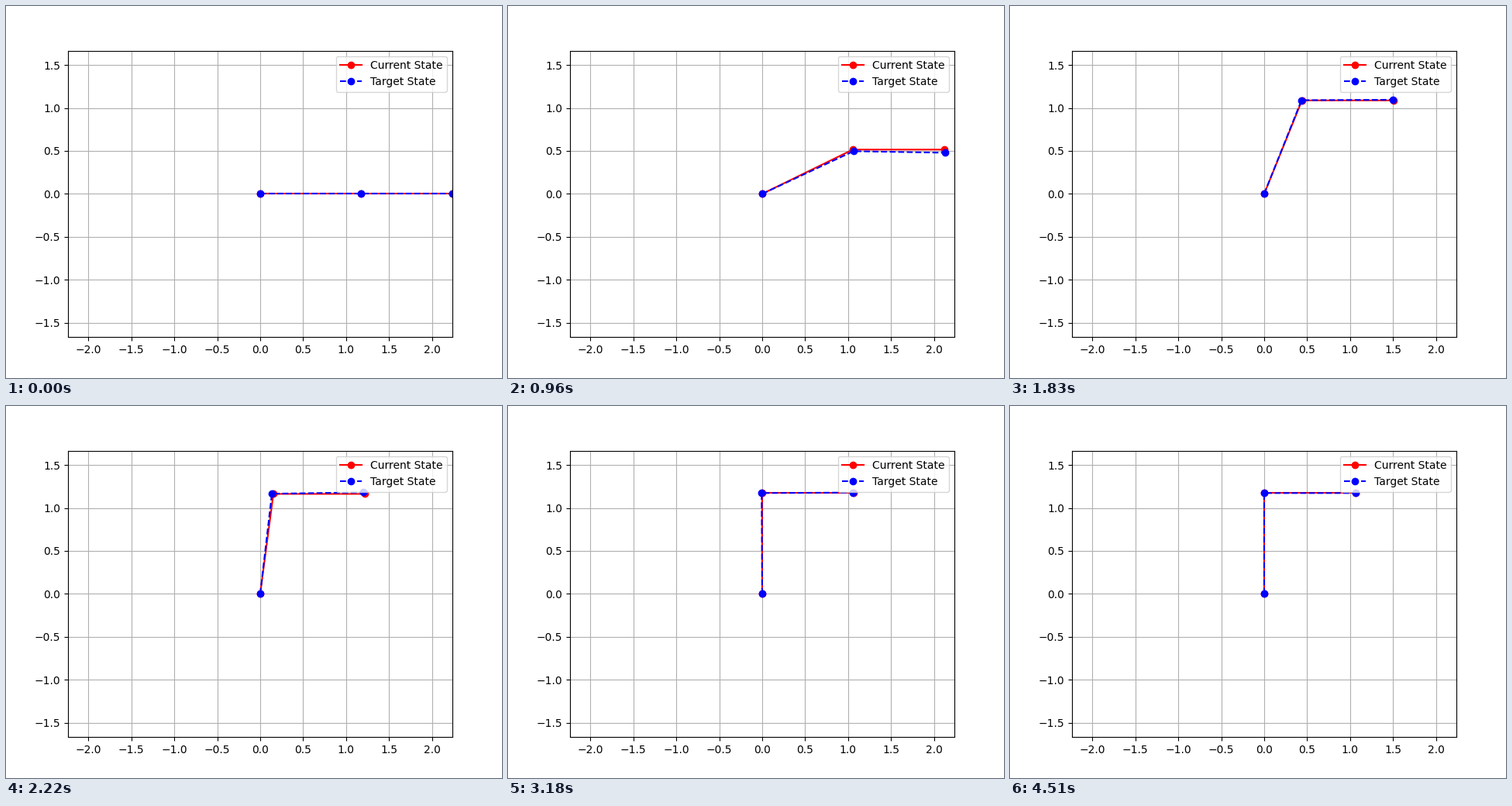
Write a matplotlib script that moves like this. It is 640 px wide and 480 px high and loops after 9.46 s.

```python
import numpy as np
import matplotlib.pyplot as plt
from matplotlib.animation import FuncAnimation

LOOP, TICK = 9460, 20          # ms
STEP_MS, LAST = 30, 150        # motion step length, final step
L1, L2 = 1.174, 1.064          # link lengths
MOVE = 3.0                     # seconds to swing a quarter turn
DT = 1 / 30                    # simulated seconds per step
KP, KD = 30, 10                # PD gains
SUB = 40                       # integration substeps


def swing(t):
    """Cubic joint path: angle and angular speed at time t."""
    u = min(t / MOVE, 1)
    angle = np.pi / 2 * (3 * u**2 - 2 * u**3)
    speed = np.pi / 2 * 6 * u * (1 - u) / MOVE
    return angle, speed


def follow():
    """Angle of a PD-driven joint chasing the swing, one value per step."""
    q, v, h = 0.0, 0.0, DT / SUB
    out = [q]
    for i in range(LAST * SUB):
        ref, ref_v = swing((i + 0.5) * h)
        v += h * (KP * (ref - q) + KD * (ref_v - v))
        q += h * v
        out.append(q)
    return out[::SUB]


def joints(q1, q2):
    """Points of shoulder, elbow and tip."""
    ex, ey = L1 * np.cos(q1), L1 * np.sin(q1)
    return [0, ex, ex + L2 * np.cos(q1 + q2)], [0, ey, ey + L2 * np.sin(q1 + q2)]


planned = [swing(k * DT)[0] for k in range(LAST + 1)]
chased = follow()

fig, ax = plt.subplots(figsize=(6.4, 4.8), dpi=100)
reach = L1 + L2
ax.set_xlim(-reach, reach)
ax.set_ylim(-reach * 369.6 / 496, reach * 369.6 / 496)
ax.grid(True)
red, = ax.plot([], [], "ro-", label="Current State")
blue, = ax.plot([], [], "bo--", label="Target State")
ax.legend(loc="best")


def update(i):
    k = min((i * TICK + TICK // 2) // STEP_MS, LAST)
    bend = -planned[k]
    red.set_data(*joints(planned[k], bend))
    blue.set_data(*joints(chased[k], bend))
    return red, blue


def init():
    return update(0)


anim = FuncAnimation(fig, update, frames=LOOP // TICK, init_func=init,
                     interval=TICK, repeat=True, repeat_delay=0)
plt.show()
```
